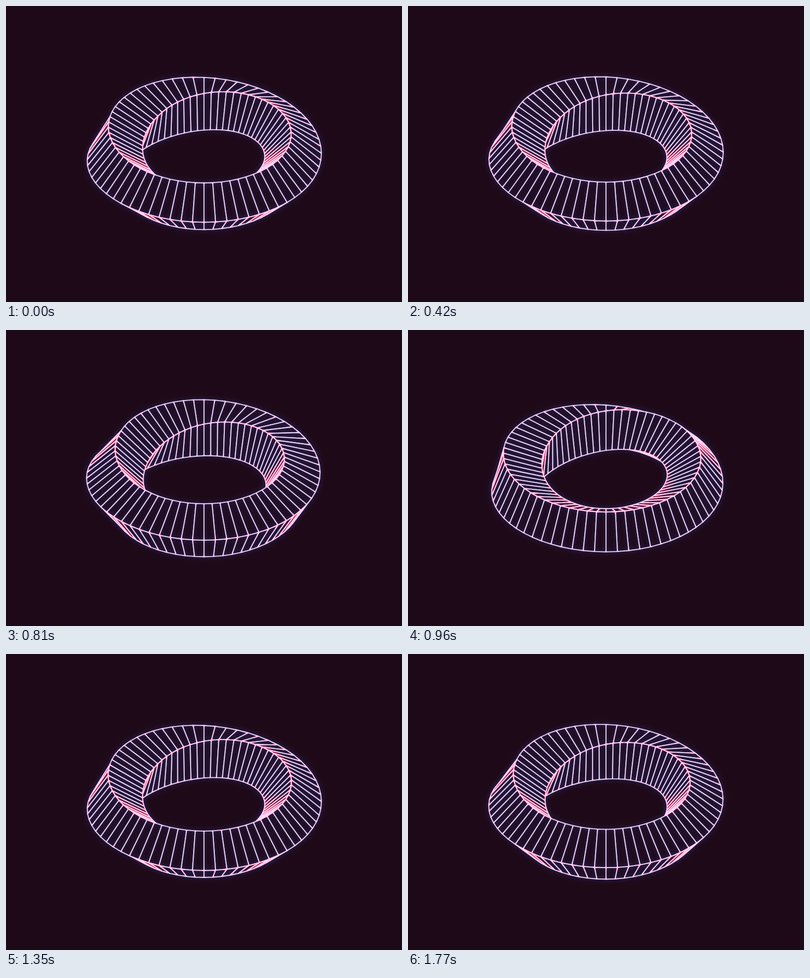
An HTML page with a canvas for the animation above (1800 ms loop, 800 by 600 pixels).

```html
<!DOCTYPE html>
<html lang="en">
<head>
<meta charset="utf-8">
<title>Twisting ring</title>
<style>
html, body { margin: 0; width: 100%; height: 100%; overflow: hidden; background: #1e0918; }
canvas { display: block; }
</style>
</head>
<body>
<canvas id="stage" width="800" height="600"></canvas>
<script>
const W = 800, H = 600, LOOP = 1800, STEP = 30;
const CX = 400, CY = 302, RADIUS = 180, SIZE = 57.3, COUNT = 64;
const TILT = Math.atan(Math.SQRT1_2), SIN = Math.sin(TILT), COS = Math.cos(TILT);
const TAU = Math.PI * 2, DEG = Math.PI / 180;

function layer() {
  const c = document.createElement('canvas');
  c.width = W;
  c.height = H;
  return c.getContext('2d');
}

const ctx = document.getElementById('stage').getContext('2d');
const lines = layer(), tinted = layer();
lines.lineWidth = 2.1;
lines.lineJoin = 'round';

// A quarter turn around the ring, gentle in front and quick at the back.
function twist(th) {
  return th / 4 + DEG * (6.3 - 6.2 * Math.cos(th) - 14.4 * Math.sin(th) + 0.6 * Math.cos(2 * th));
}

function spin(u) {
  return u * TAU + DEG * (0.3 + 2.3 * Math.cos(TAU * (u - 0.4)));
}

// th runs from the front of the ring towards the left.
function corner(j, k, turn) {
  const th = j / COUNT * TAU;
  const a = k * Math.PI / 2 - turn - twist(th);
  const r = RADIUS + SIZE * Math.cos(a), z = SIZE * Math.sin(a);
  const front = r * Math.cos(th);
  return {
    x: CX - r * Math.sin(th),
    y: CY + front * SIN - z * COS,
    d: front * COS + z * SIN
  };
}

function visibleFaces(turn) {
  const faces = [];
  for (let j = 0; j < COUNT; j++) {
    for (let k = 0; k < 4; k++) {
      const p = [corner(j, k, turn), corner(j + 1, k, turn),
                 corner(j + 1, k + 1, turn), corner(j, k + 1, turn)];
      const area = (p[2].x - p[0].x) * (p[3].y - p[1].y) - (p[2].y - p[0].y) * (p[3].x - p[1].x);
      if (area > 0) faces.push({ p, d: p[0].d + p[1].d + p[2].d + p[3].d });
    }
  }
  return faces.sort((a, b) => a.d - b.d);
}

function drawLines(turn) {
  lines.fillStyle = '#000';
  lines.strokeStyle = '#fff';
  lines.fillRect(0, 0, W, H);
  for (const { p } of visibleFaces(turn)) {
    lines.beginPath();
    p.forEach(q => lines.lineTo(q.x, q.y));
    lines.closePath();
    lines.fill();
    lines.stroke();
  }
}

function addLight(filter, color) {
  tinted.globalCompositeOperation = 'source-over';
  tinted.fillStyle = '#000';
  tinted.fillRect(0, 0, W, H);
  tinted.filter = filter;
  tinted.drawImage(lines.canvas, 0, 0);
  tinted.filter = 'none';
  tinted.globalCompositeOperation = 'multiply';
  tinted.fillStyle = color;
  tinted.fillRect(0, 0, W, H);
  ctx.globalCompositeOperation = 'lighter';
  ctx.drawImage(tinted.canvas, 0, 0);
}

let shown = -1;

function frame() {
  const n = Math.floor(performance.now() % LOOP / STEP);
  if (n !== shown) {
    shown = n;
    drawLines(spin(n * STEP / LOOP));
    ctx.globalCompositeOperation = 'source-over';
    ctx.fillStyle = '#1e0918';
    ctx.fillRect(0, 0, W, H);
    // soft halo, red where lines crowd together, then the lines
    addLight('blur(5px) brightness(4)', 'rgb(5,12,32)');
    addLight('blur(2.5px) brightness(0.92) contrast(3)', 'rgb(225,8,12)');
    addLight('none', 'rgb(194,190,190)');
  }
  requestAnimationFrame(frame);
}
frame();
</script>
</body>
</html>
```
